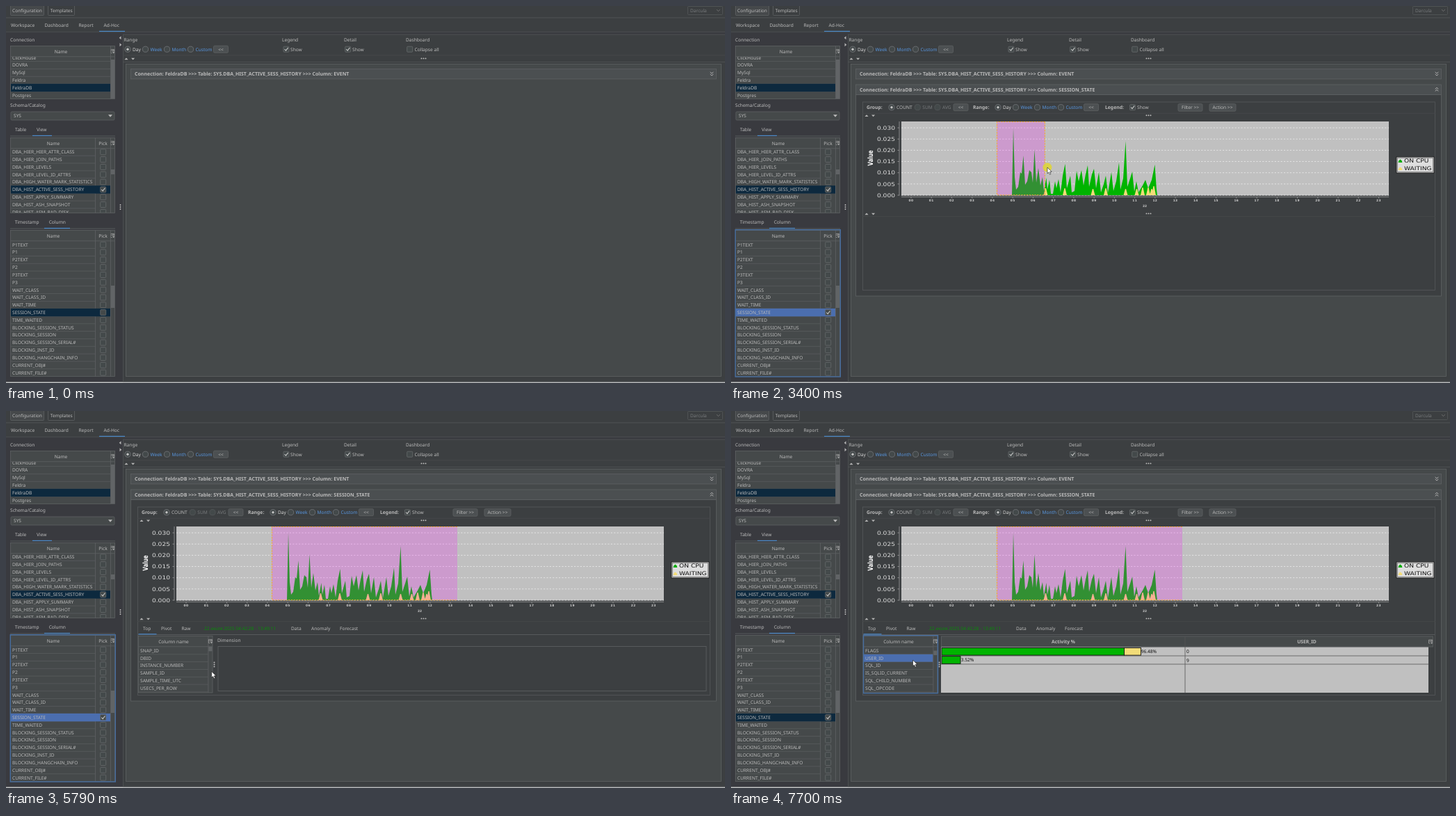
Animation of 1034 by 542 pixels, one loop 8 s. Source, as an HTML page:

```html
<!DOCTYPE html>
<html lang="en">
<head>
<meta charset="utf-8">
<title>Ad-hoc history</title>
<style>
html, body { margin: 0; width: 100%; height: 100%; overflow: hidden; background: #3c3f41; }
#stage { display: block; width: 100vw; height: 100vh; }
text { font: 6.62px "Noto Sans", sans-serif; fill: #bbb; text-rendering: geometricPrecision; white-space: pre; }
.bold { font-weight: 700; font-size: 6.8px; }
.title { font-weight: 700; font-size: 7px; }
.mid { text-anchor: middle; }
.axis { font: 7.6px "DejaVu Sans", sans-serif; fill: #ddd; }
.hour { font: 700 4.4px "DejaVu Sans", sans-serif; fill: #ccc; text-anchor: middle; }
.link { fill: #5896e0; }
.off { fill: #777a7c; }
.on { fill: #d6d6d6; }
.ink { fill: #111; }
.dark { fill: #3c3f41; }
</style>
</head>
<body>
<svg id="stage" viewBox="0 0 1034 542" preserveAspectRatio="none"></svg>
<script>
const BG = '#3c3f41', FIELD = '#45494a', GAP = '#393a3f', EDGE = '#5e6163', GRID = '#585b5d';
const BLUE = '#4a88c7', DARK_SEL = '#0d293e', SEL = '#4b6eaf', FOCUS = '#466d9f';
const GREEN = '#00b400', YELLOW = '#f2dc78';
const ROW = 10.82;

const rect = (x, y, w, h, fill, extra = '') =>
  `<rect x="${x}" y="${y}" width="${w}" height="${h}" fill="${fill}" ${extra}/>`;
const box = (x, y, w, h, fill = 'none', stroke = EDGE, r = 0) =>
  rect(x + .5, y + .5, w - 1, h - 1, fill, `stroke="${stroke}" stroke-width=".8" rx="${r}"`);
const path = (d, fill = 'none', stroke = 'none', w = 1, extra = '') =>
  `<path d="${d}" fill="${fill}" stroke="${stroke}" stroke-width="${w}" ${extra}/>`;
const text = (x, y, s, cls = '', extra = '') => `<text x="${x}" y="${y}" class="${cls}" ${extra}>${s}</text>`;
const group = (id, s) => `<g id="${id}">${s}</g>`;
const clip = (x, y, w, h, s) =>
  `<svg x="${x}" y="${y}" width="${w}" height="${h}" viewBox="${x} ${y} ${w} ${h}">${s}</svg>`;

const tick = (x, y) => path(`M${x - 2.4} ${y}l1.9 2l3.2 -4.3`, 'none', '#c4c4c4', 1.1);
const check = (x, y, on) => box(x - 4.5, y - 4.5, 9, 9, '#43494a', '#686b6d', 1) + (on ? tick(x, y) : '');
const radio = (x, y, label, cls = '', on = false) =>
  `<circle cx="${x}" cy="${y}" r="4.1" fill="#43494a" stroke="${cls === 'off' ? '#55585a' : '#74777a'}" stroke-width=".8"/>` +
  (on ? `<circle cx="${x}" cy="${y}" r="1.7" fill="#c4c4c4"/>` : '') + text(x + 7, y + 2.6, label, cls);
const button = (x, y, w, h, label) =>
  box(x, y, w, h, '#4c5052', EDGE, 1.5) + text(x + w / 2, y + h / 2 + 2.4, label, 'mid');
const dots = (x, y, vertical) => [-3, 0, 3].map(d =>
  `<circle cx="${x + (vertical ? 0 : d)}" cy="${y + (vertical ? d : 0)}" r=".95" fill="#c0c0c0"/>`).join('');
const grips = (x, y) => path(`M${x - 2.6} ${y + 1.3}h5.2l-2.6 -2.8zM${x + 7} ${y - 1.3}h5.2l-2.6 2.8z`, '#b4b4b4') + dots(600.5, y - .6);
const underline = (x, w, y) => rect(x, y, w, 1.2, BLUE);
const menuIcon = (x, y) => path(`M${x - 2.5} ${y - 2.5}h5.2v3M${x - 2.5} ${y - 2.5}v5h2M${x - 2.5} ${y - .6}h5M${x + 1} ${y - 2.5}v3`, 'none', '#aaa', .7) +
  path(`M${x} ${y + 1.3}h3.4l-1.7 1.9z`, '#bbb');
const chevrons = (x, y, s) => path([-2.4, .6].map(d => `M${x - 2.3} ${y + s * d}l2.3 ${s * 2}l2.3 ${-s * 2}`).join(''), 'none', '#bbb', .9);

// Grid lines, then the selected row over them, then the names; y is the middle of the first row.
const rows = (names, x, y, right, selected) =>
  names.map((n, i) => rect(x, y + (i + .5) * ROW - .4, right - x, .8, GRID)).join('') + selected +
  names.map((n, i) => text(x + 2, y + i * ROW + 2.4, n)).join('');

function table({ x, y, w, h, names, first, split, chosen, checked, thumb, selId }) {
  const right = x + w - 7, nameEnd = split || right;
  const selected = rect(x + 1, first + (chosen - .5) * ROW - .3, right - x - 1, ROW + .6, DARK_SEL, selId ? `id="${selId}"` : '');
  let s = box(x, y, w, h, FIELD);
  s += text((x + nameEnd) / 2 + 1, y + 10.6, 'Name', 'mid') + menuIcon(x + w - 4, y + 8);
  if (split) s += text(139.5, y + 10.6, 'Pick', 'mid') + rect(split, y, .8, h, EDGE);
  s += clip(x + 1, y + 16, w - 2, h - 17, rows(names, x + 1, first, nameEnd, selected) +
    (split ? names.map((n, i) => check(139.7, first + i * ROW, i === checked)).join('') : ''));
  s += rect(x + 1, y + 15.4, w - 2, .8, EDGE) + rect(right, y, .8, h, EDGE);
  return s + rect(right + .8, thumb[0], 5.4, thumb[1] - thumb[0], '#616466');
}

function frame() {
  let s = rect(0, 0, 1034, 542, BG);
  s += box(6, -2, 49, 16, '#46494b', EDGE, 1) + text(30.5, 9, 'Configuration', 'mid');
  s += box(60, -2, 39, 16, BG, EDGE, 1) + text(79.8, 9, 'Templates', 'mid');
  s += box(980, 0, 51, 13, BG, '#55585a', 1) + text(984, 9, 'Darcula', 'off') + path('M1022 5l2.4 2.6l2.4 -2.6', 'none', '#777', .8);
  s += rect(0, 16.5, 1034, .8, '#55585a');
  s += rect(0, 37.5, 1034, 3, GAP) + rect(0, 37.5, 168, 503, GAP) + rect(0, 36.8, 1034, .8, '#505355');
  [[7, 'Workspace'], [55.5, 'Dashboard'], [104.5, 'Report'], [140.5, 'Ad-Hoc']].forEach(([x, n]) => s += text(x, 29.9, n));
  s += underline(134, 37, 35.8);
  s += rect(0, 540.5, 1034, 1.5, '#bfc1c2');
  s += path('M165.5 43.3v5l-2.8 -2.5zM163.5 53.3v5l2.8 -2.5z', '#b4b4b4') + dots(164.5, 289, true);
  return s;
}

function sidebar() {
  let s = text(6, 51.2, 'Connection');
  s += table({ x: 6, y: 57, w: 151, h: 77, first: 74.2, chosen: 4, thumb: [77, 133],
    names: ['ClickHouse', 'DOVRA', 'MySql', 'Feldra', 'FeldraDB', 'Postgres'] });
  s += text(6, 145.3, 'Schema/Catalog') + box(6.5, 151.5, 150, 13, FIELD, EDGE, 1.5) + text(11, 160.4, 'SYS') + path('M147 156.3h6l-3 3.4z', '#bbb');
  s += text(13, 180, 'Table') + text(44, 180, 'View') + rect(6, 186.6, 151, .8, EDGE) + underline(38, 28, 185.8);
  s += table({ x: 6, y: 189, w: 151, h: 109, first: 209.8, split: 128, chosen: 5, checked: 5, thumb: [235, 242],
    names: ['HIER_HIER_ATTR_CLASS', 'HIER_JOIN_PATHS', 'HIER_LEVELS', 'HIER_LEVEL_ID_ATTRS', 'HIGH_WATER_MARK_STATISTICS',
      'HIST_ACTIVE_SESS_HISTORY', 'HIST_APPLY_SUMMARY', 'HIST_ASH_SNAPSHOT', 'HIST_ASM_BAD_DISK'].map(n => 'DBA_' + n) });
  s += text(12.7, 313.4, 'Timestamp') + text(61.7, 313.4, 'Column') + rect(6, 319.6, 151, .8, EDGE) + underline(55, 37, 318.9);
  s += table({ x: 6, y: 322, w: 151, h: 211, first: 343.2, split: 128, chosen: 9, thumb: [402, 434], selId: 'stateRow',
    names: ['P1TEXT', 'P1', 'P2TEXT', 'P2', 'P3TEXT', 'P3', 'WAIT_CLASS', 'WAIT_CLASS_ID', 'WAIT_TIME', 'SESSION_STATE', 'TIME_WAITED',
      'BLOCKING_SESSION_STATUS', 'BLOCKING_SESSION', 'BLOCKING_SESSION_SERIAL#', 'BLOCKING_INST_ID', 'BLOCKING_HANGCHAIN_INFO', 'CURRENT_OBJ#', 'CURRENT_FILE#'] });
  s += group('stateTick', tick(139.7, 440.6));
  return s + group('stateFocus', rect(6.3, 321.7, 151, 211.3, 'none', `stroke="${FOCUS}" stroke-width="1.4"`));
}

const ranges = (x, y) => radio(x, y, 'Day', 'on', true) + radio(x + 25.5, y, 'Week', 'link') +
  radio(x + 56.5, y, 'Month', 'link') + radio(x + 90.5, y, 'Custom', 'link') + button(x + 123, y - 5.5, 22, 11, '&lt;&lt;');
const heading = (y, column, dir) => box(179, y - 7.5, 843, 15.5, '#4b4f51') +
  text(185, y + 2.6, `Connection: FeldraDB >>> Table: SYS.DBA_HIST_ACTIVE_SESS_HISTORY >>> Column: ${column}`, 'title') + chevrons(1015, y, dir);

function workspace() {
  let s = box(168, 40.5, 870, 500, 'none', '#505355');
  s += text(169.5, 51.2, 'Range') + ranges(175, 62.2);
  s += text(397, 51.2, 'Legend') + check(403, 62.2, true) + text(409, 64.8, 'Show');
  s += text(486, 51.2, 'Detail') + check(491.7, 62.2, true) + text(498, 64.8, 'Show');
  s += text(575, 51.2, 'Dashboard') + check(580.7, 62.2) + text(587.5, 64.8, 'Collapse all');
  s += rect(168, 70.5, 866, .8, '#484b4d') + grips(173, 76) + rect(168, 80, 866, .8, '#505355');
  return s + box(172, 83, 857, 450, FIELD) + heading(97.4, 'EVENT', 1);
}

// Points of the ON CPU area: x, height.
const CPU = [404,0, 406,97, 408,26, 410,8, 413,12, 416,33, 418,31, 420.5,57, 423,15, 426,20, 429,36, 432,33, 434,18, 436.5,66,
  439,18, 442,39, 445,14, 448,26, 450,6, 453.5,25, 455,8, 458,22, 460,2, 463,2, 466,20, 468,10, 471,23, 474,4, 477,28, 480.5,45,
  483,10, 488,28, 490,4, 494,6, 497,35, 500,20, 504,36, 507,14, 510,30, 513,43, 515,12, 519,30, 522,38, 525,10, 529,33, 532,4,
  536,16, 539,28, 542,3, 547,33, 550,6, 554,20, 558,47, 560,8, 564,24, 567.5,78, 570,12, 574,24, 577,34, 580,5, 583,20, 586,4,
  592,14, 596,22, 600,10, 605,22, 609.5,44, 612,8, 613,0];
const WAITS = [[452.5, 10], [480, 10], [520.5, 9], [539, 10], [567.5, 9], [583.5, 9], [592, 11], [600, 11], [605, 9], [608, 13]];

function chart() {
  const scaled = (x, y, s, cls, anchor) =>
    `<text transform="translate(${x} ${y}) scale(1.2 1)" class="${cls}" text-anchor="${anchor}">${s}</text>`;
  let s = rect(245, 166, 701, 106.5, '#c0c0c0');
  for (let i = 0; i < 7; i++) {
    const y = 272 - i * 16.15;
    s += path(`M245 ${y}H946`, 'none', '#f2f2f2', .7, 'stroke-dasharray="2.2 2.2"');
    s += path(`M239.5 ${y}h2.5`, 'none', '#aaa', .7) + scaled(236, y + 2.7, (i * .005).toFixed(3), 'axis', 'end');
  }
  s += path('M242 166V272.5M245 274.5H946', 'none', '#999', .8);
  for (let h = 0; h < 24; h++) {
    const x = 259 + h * 29.24;
    s += path(`M${x} 274.5v2`, 'none', '#aaa', .7) + text(x, 281, String(h).padStart(2, '0'), 'hour', 'letter-spacing=".4"');
  }
  s += text(595, 288.6, '22', 'hour');
  s += '<text transform="translate(203.5 218.5) scale(1.4 1) rotate(-90)" class="axis" text-anchor="middle" style="font-weight:700;font-size:7.2px;fill:#fff">Value</text>';
  let d = '';
  for (let i = 0; i < CPU.length; i += 2) d += `${i ? 'L' : 'M'}${CPU[i]} ${272 - CPU[i + 1]}`;
  s += path(d + 'Z', GREEN);
  s += path(WAITS.map(([x, h]) => `M${x - 3} 272l2.4 ${-h}h1.2l2.4 ${h}z`).join(''), YELLOW);
  s += group('range', rect(382, 166, 10, 106, '#fa00ff', 'id="shade" fill-opacity=".2"') +
    path('', 'none', '#f6ae2c', 1.1, 'id="dash" stroke-dasharray="2.2 1.6"'));
  s += box(956.5, 216.5, 55, 24, '#dedede', '#111') + box(958, 218, 52, 21, 'none', '#777');
  [['ON CPU', 222.8, '#00aa00'], ['WAITING', 233.6, YELLOW]].forEach(([n, y, c]) => {
    s += path(`M959.5 ${y + 2.3}l1.3 -3.3l2 -1.2l1.8 1.8l.8 2.7z`, c);
    s += scaled(968, y + 2.6, n, 'axis ink', 'start');
  });
  return s;
}

function result() {
  const bar = (x, y, w, c) => rect(x, y, w, 10.6, c, 'stroke="#111" stroke-width=".9"');
  let s = rect(301, 323, 709, 83, BG) + box(302, 323.5, 708, 16, FIELD) + rect(302, 339.5, 701, 65.5, '#c0c0c0');
  s += text(478, 334, 'Activity %', 'bold mid') + text(828, 334, 'USER_ID', 'bold mid') + menuIcon(1006, 331.5);
  s += rect(652.6, 324, .8, 81, '#555') + rect(302, 351.6, 701, .8, '#555') + rect(302, 363.6, 701, .8, '#555');
  s += bar(303, 340.5, 262.5, GREEN) + bar(565.5, 340.5, 24, YELLOW) + bar(303, 352.7, 27, GREEN);
  s += text(589.7, 347.9, '96.48%', 'ink') + text(655, 348.4, '0', 'ink');
  return s + text(330.7, 360, '3.52%', 'ink') + text(655, 361, '9', 'ink');
}

function details() {
  let s = '';
  [[197, 'Top'], [223, 'Pivot'], [252.5, 'Raw'], [410, 'Data'], [439, 'Anomaly'], [480, 'Forecast']].forEach(([x, n]) => s += text(x, 314.6, n));
  s += text(285, 314.6, '22 июля 2025 04:42:28 - 13:49:11', '', 'style="fill:#0b8a0b"');
  s += rect(190, 321, 822, .8, EDGE) + underline(190.5, 26, 320.2);
  s += box(190, 323, 107.5, 82.5, FIELD);
  const names = ['SNAP_ID', 'DBID', 'INSTANCE_NUMBER', 'SAMPLE_ID', 'SAMPLE_TIME_UTC', 'USECS_PER_ROW', 'SESSION_ID', 'SESSION_SERIAL#',
    'SESSION_TYPE', 'FLAGS', 'USER_ID', 'SQL_ID', 'IS_SQLID_CURRENT', 'SQL_CHILD_NUMBER', 'SQL_OPCODE'];
  const selected = rect(191, 344.4 + 9.5 * ROW, 99.5, ROW, SEL, 'id="userRow"');
  s += clip(191, 339, 106, 65.5, group('list', rows(names, 191, 344.4, 290.5, selected)));
  s += rect(191, 338.4, 106, .8, EDGE) + rect(290.5, 323, .8, 82, EDGE) + text(241, 333.9, 'Column name', 'mid') + menuIcon(293.8, 331);
  s += rect(291.3, 338.8, 5.2, 6.5, '#616466', 'id="thumb"') + dots(299.5, 364.5, true);
  s += group('listFocus', rect(190.5, 322.7, 107, 83, 'none', `stroke="${FOCUS}" stroke-width="1.4"`));
  s += text(304, 332.3, 'Dimension') + box(304.5, 338, 703, 65, BG);
  return s + group('result', result());
}

function progress() {
  const label = cls => text(600, 173.5, 'Creating history chart...', 'mid ' + cls);
  return rect(533, 163, 135, 16.5, '#5a5d5f') + label('') +
    `<clipPath id="blockClip">${rect(533, 163, 23, 16.5, '#fff', 'id="block"')}</clipPath>` +
    `<g clip-path="url(#blockClip)">${rect(533, 163, 135, 16.5, '#a0a0a0')}${label('dark')}</g>`;
}

function pane() {
  let s = box(179, 127, 843, 290.5, BG) + heading(120, 'SESSION_STATE', -1);
  s += box(189, 137.5, 824, 271.5, BG, '#55585a');
  s += text(195, 148.3, 'Group:', 'bold') + radio(231, 145.7, 'COUNT', '', true) + radio(268.3, 145.7, 'SUM', 'off') + radio(297, 145.7, 'AVG', 'off');
  s += button(319.5, 140.2, 22, 11, '&lt;&lt;') + text(348, 148.3, 'Range:', 'bold') + ranges(384, 145.7);
  s += text(538, 148.3, 'Legend:', 'bold') + check(577.5, 145.7, true) + text(584, 148.3, 'Show');
  s += button(642.5, 140.2, 36, 11.5, 'Filter >>') + button(687.5, 140.2, 39, 11.5, 'Action >>');
  s += rect(189, 153.8, 824, .8, '#46494b') + grips(195, 157.8);
  s += grips(195, 299) + rect(189, 302.3, 824, .8, '#46494b');
  return s + group('progress', progress()) + group('chart', chart()) + group('details', details());
}

const pointer = group('spot', '<circle r="6.5" fill="#ded43c" fill-opacity=".9"/>') +
  group('arrow', path('M0 0V8.8L2 7L3.5 10.2L5 9.5L3.6 6.4H6.4Z', '#fff', '#111', .6)) +
  group('sizer', path('M0 -5l2.5 3h-1.7v6h1.7L0 7l-2.5 -3h1.7v-6h-1.7z', '#fff', '#111', .7));

const stage = document.getElementById('stage');
stage.innerHTML = frame() + sidebar() + workspace() + group('pane', pane()) + group('pointer', pointer);
const ui = {};
stage.querySelectorAll('[id]').forEach(e => ui[e.id] = e);
const show = (name, on) => ui[name].setAttribute('display', on ? 'inline' : 'none');
const set = (name, key, value) => ui[name].setAttribute(key, value);

// Pointer stops: time, x, y.
const STOPS = [[120, 936, 521], [470, 515, 375], [670, 514, 375], [1440, 134, 437], [1510, 134, 437.5], [1720, 136, 441], [2120, 136, 441],
  [2660, 352, 300], [2860, 383, 234], [3190, 384, 232], [3880, 617, 232], [3950, 635, 232], [4020, 649, 232], [4280, 649, 232],
  [4900, 542, 344], [5100, 541, 344], [5860, 275, 377], [6280, 275, 377], [6490, 272, 378], [6620, 265, 376], [6820, 265, 376],
  [6960, 263, 370], [7290, 263, 369], [7700, 261.5, 358]];
const LOOP = 8000, STEP = 70;

function pointerAt(t) {
  let i = 0;
  while (i < STOPS.length - 1 && STOPS[i + 1][0] <= t) i++;
  const [t0, x0, y0] = STOPS[i], next = STOPS[i + 1];
  if (!next || t < t0) return [x0, y0];
  const [t1, x1, y1] = next;
  let p = Math.floor((t - t0) / STEP) * STEP / (t1 - t0);
  if (t1 - t0 > 300 && t0 !== 3190) p = p * p * (3 - 2 * p);
  return [x0 + (x1 - x0) * p, y0 + (y1 - y0) * p];
}

function render(t) {
  const [x, y] = pointerAt(t);
  const picked = t >= 2120, charted = t >= 2790, chosen = t >= 7430, dragging = t >= 3190 && t < 4020;
  show('pointer', t >= 120);
  set('pointer', 'transform', `translate(${x} ${y})`);
  const resizing = t >= 2260 && t < 2790 && y > 293 && y < 304;
  show('sizer', resizing);
  show('arrow', !resizing);
  show('spot', t >= 3190 && t < 4280);

  show('stateTick', picked);
  show('stateFocus', picked && !chosen);
  set('stateRow', 'fill', picked && !chosen ? SEL : DARK_SEL);
  show('pane', t >= 2260);
  show('progress', t >= 2390 && !charted);
  set('block', 'x', 533 + Math.max(0, Math.min(112, (t - 2390) * .104)));
  show('chart', charted);

  const edge = dragging ? Math.max(383, x - 3.5) : 649;
  show('range', t >= 3190);
  set('shade', 'width', edge - 382);
  set('dash', 'd', `M${edge} 166.5H382.5V271.7H${edge}` + (dragging ? 'V166.5' : ''));

  show('details', t >= 4280);
  const notches = (t >= 5860) + (t >= 5930) + (t >= 6000);
  set('list', 'transform', `translate(0 ${-notches * 3 * ROW})`);
  set('thumb', 'y', 338.8 + notches * 1.9);
  show('userRow', chosen);
  show('listFocus', chosen);
  show('result', t >= 7500);
}

const start = performance.now();
function tickFrame(now) {
  render(Math.max(0, now - start) % LOOP);
  requestAnimationFrame(tickFrame);
}
render(0);
requestAnimationFrame(tickFrame);
</script>
</body>
</html>
```
